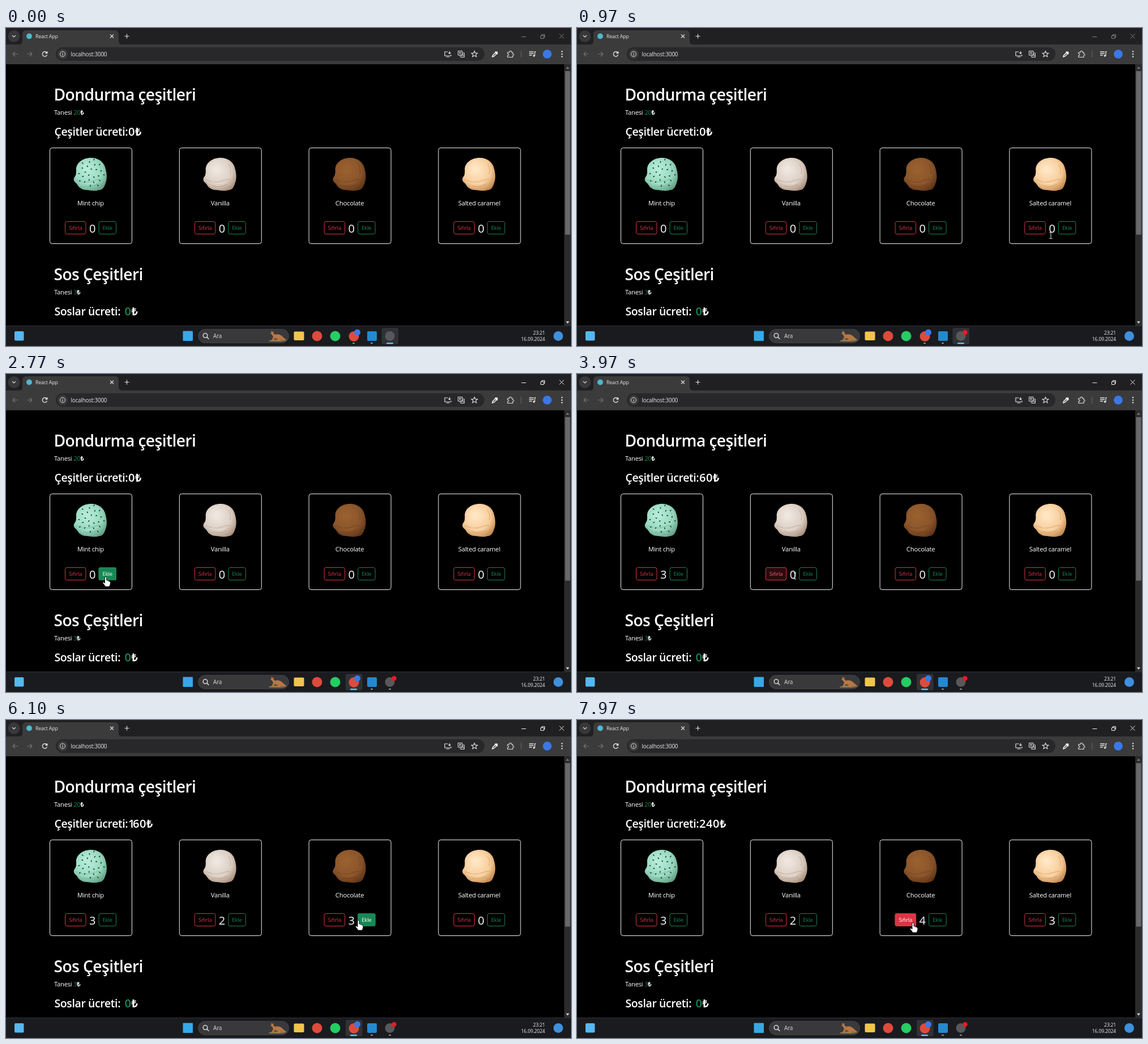
An HTML page with a canvas for the animation above (8000 ms loop, 998 px wide and 561 px high).

```html
<!DOCTYPE html>
<html lang="tr">
<head>
<meta charset="utf-8">
<title>React App</title>
<style>
html, body { margin: 0; width: 100%; height: 100%; overflow: hidden; background: #000; }
canvas { display: block; width: 100vw; height: 100vh; }
</style>
</head>
<body>
<canvas id="stage" width="998" height="561"></canvas>
<script>
const ctx = document.getElementById('stage').getContext('2d');
const LOOP = 8000, GREEN = '#198754', RED = '#dc3545', PITCH = 228.8;
const FOCUS_AT = 2700, REC_AT = 400, CURSOR_AT = 300;

const cards = [
  { name: 'Mint chip', tones: ['#b4ecd9', '#98d9c0', '#5f9a80'], chips: true, clicks: [2830, 3130, 3450] },
  { name: 'Vanilla', tones: ['#eee6df', '#dccfc4', '#a58a76'], clicks: [4250, 4550] },
  { name: 'Chocolate', tones: ['#99602f', '#8b552b', '#5c3316'], clicks: [5400, 5650, 5900, 6200] },
  { name: 'Salted caramel', tones: ['#ffe6c4', '#f7cd9b', '#bd8148'], clicks: [6850, 7050, 7250] }
];

// start time, end time, destination
const moves = [
  [1750, 2450, 176, 358], [3700, 4050, 416, 356], [4850, 5090, 622.5, 354],
  [6330, 6650, 878, 357], [7330, 7850, 593.5, 358]
];

function cursorAt(t) {
  let x = 837, y = 366;
  for (const [a, b, tx, ty] of moves) {
    const u = Math.min(1, Math.max(0, (t - a) / (b - a)));
    const s = u * u * (3 - 2 * u);
    x += (tx - x) * s;
    y += (ty - y) * s;
  }
  return { x, y };
}

function partAt(t) {
  if (t < CURSOR_AT) return null;
  const { x, y } = cursorAt(t);
  const card = Math.floor((x - 77) / PITCH), dx = x - card * PITCH;
  if (y > 341 && y < 365) {
    if (dx > 104 && dx < 142) return { card, kind: 'reset' };
    if (dx > 163.5 && dx < 195.5) return { card, kind: 'add' };
  }
  return dx > 145 && dx < 160 && y > 341 && y < 368 ? { card, kind: 'digit' } : null;
}

// Averaging the recent hover state gives a 150 ms fade.
function hoverLevel(t, card, kind) {
  let sum = 0;
  for (let k = 0; k < 10; k++) {
    const p = partAt(t - k * 15);
    if (p && p.card === card && p.kind === kind) sum++;
  }
  return sum / 10;
}

function text(s, x, y, size, color = '#fff', weight = 400, align = 'left') {
  ctx.font = `${weight} ${size}px "Open Sans", "Noto Sans", sans-serif`;
  ctx.letterSpacing = `${-0.02 * size}px`;
  ctx.textAlign = align;
  ctx.fillStyle = color;
  ctx.fillText(s, x, y);
  return x + ctx.measureText(s).width;
}

function rect(x, y, w, h, color) {
  ctx.fillStyle = color;
  ctx.fillRect(x, y, w, h);
}

function round(x, y, w, h, r, fill, stroke) {
  ctx.beginPath();
  ctx.roundRect(x, y, w, h, r);
  paint(fill, stroke);
}

function disc(x, y, r, fill, stroke, width) {
  ctx.beginPath();
  ctx.arc(x, y, r, 0, 7);
  paint(fill, stroke, width);
}

function paint(fill, stroke, width = 1) {
  if (fill) { ctx.fillStyle = fill; ctx.fill(); }
  if (stroke) { ctx.strokeStyle = stroke; ctx.lineWidth = width; ctx.stroke(); }
}

function path(d, x, y, fill, stroke, width) {
  const p = new Path2D(d);
  ctx.save();
  ctx.translate(x, y);
  if (fill) { ctx.fillStyle = fill; ctx.fill(p); }
  if (stroke) { ctx.strokeStyle = stroke; ctx.lineWidth = width || 1.2; ctx.stroke(p); }
  ctx.restore();
}

const line = (d, x, y, color = '#dedede', width = 1.2) => path(d, x, y, null, color, width);

function drawBrowser(active) {
  rect(0, 0, 998, 29, '#202022');
  rect(0, 29, 998, 35, '#3b3b3c');
  disc(14, 14.5, 10.5, '#38383a');
  line('M-3-1.5L0 1.5L3-1.5', 14, 14.5);
  ctx.beginPath();
  ctx.moveTo(23, 29);
  ctx.quadraticCurveTo(29, 29, 29, 23);
  ctx.lineTo(29, 11);
  ctx.quadraticCurveTo(29, 4, 36, 4);
  ctx.lineTo(192, 4);
  ctx.quadraticCurveTo(199, 4, 199, 11);
  ctx.lineTo(199, 23);
  ctx.quadraticCurveTo(199, 29, 205, 29);
  paint('#3b3b3c');
  disc(41, 14.5, 5, '#4fb6cf');
  text('React App', 52, 18, 8.8, '#e6e6e6');
  line('M-3-3L3 3M3-3L-3 3', 187, 14.5);
  line('M-4 0H4M0-4V4', 213.5, 14.5);

  const control = active ? '#f2f2f2' : '#858585';
  line('M-4 0H4', 914.5, 15.5, control, 1);
  line('M-3.5-1.5H2V3.5H-3.5ZM-1.5-1.5V-3.5H3.5V1.5H2', 948, 15, control, 1);
  line('M-4-4L4 4M4-4L-4 4', 981.5, 14.5, control, 1);

  line('M5 0H-4M0-4L-4 0L0 4', 16, 46, '#747474');
  line('M-5 0H4M0-4L4 0L0 4', 42, 46, '#747474');
  line('M3.5-2.5A4.2 4.2 0 1 0 4 1.5M4.3-4.5V-1.5H1', 68.5, 46, '#e4e4e4', 1.4);
  round(88, 34, 757, 24, 12, '#28282a');
  disc(100, 46, 9, '#3b3b3c');
  disc(100, 46, 4.5, null, '#e0e0e0', 1);
  line('M0-2.6V-1.4M0-.4V2.6', 100, 46);
  text('localhost:3000', 114.5, 50, 9.9, '#e8e8e8');

  line('M0-4H-5.5V3H5.5V1M-3 5H3M3-5V-.5M1-2.5L3-.5L5-2.5', 780.5, 46);
  line('M-5.5-5.5H2V2H-5.5ZM2-2H5.5V5.5H-1L-2 2M-4-3H.5M-2-4V-3Q-2-1-4 0M-3-2L0 .5M.5 4L2.5-.5L4.5 4', 804, 46, '#dedede', 1);
  line('M0-5.3L1.5-1.8L5.3-1.6L2.4 .9L3.4 4.7L0 2.6L-3.4 4.7L-2.4 .9L-5.3-1.6L-1.5-1.8Z', 827.5, 46);
  line('M-5 5L-4 2L1-3L3-1L-2 4Z', 864, 46, '#fff', 1.4);
  line('M0-4L4 0M2-2L4-4', 864, 46, '#fff', 2.6);
  line('M-5-3H-2Q-2-5.5 0-5.5T2-3H4V-.5Q6-.5 6 1T4 2.5V5.5H-5V2.5Q-3 2.5-3 1T-5-.5Z', 891, 46);
  rect(909.5, 40, 1, 12, '#68686a');
  line('M-6-4H2M-6-1H2M-6 2H-1M4 3V-4H6', 930, 46, '#dedede', 1.3);
  disc(932.5, 49, 1.8, '#dedede');
  disc(956, 46, 7.8, '#3b78e7');
  for (const y of [41.5, 46, 50.5]) disc(982, y, 1.3, '#e0e0e0');
}

function drawScrollbar() {
  rect(986, 64, 12, 462, '#2b2b2c');
  rect(987.5, 76, 9, 288.5, '#69696b');
  path('M-3 2L0-2L3 2Z', 992, 70, '#777');
  path('M-3-2L0 2L3-2Z', 992, 519.5, '#d6d6d6');
}

const SCOOP = 'M-25-7C-26-20-13-29 1-29C15-29 25-21 27-9C29-2 30 8 27 15C25 22 22 28 15 28' +
  'C9 30 2 29-4 28C-10 28-14 27-18 24C-22 22-22 18-26 15C-30 12-30 8-28 5C-25 2-25-2-25-7Z';

function drawScoop(x, y, { tones, chips }) {
  const g = ctx.createRadialGradient(-6, -9, 4, -3, -4, 38);
  tones.forEach((c, i) => g.addColorStop([0, 0.6, 1][i], c));
  path(SCOOP, x, y, g);
  ctx.globalAlpha = 0.45;
  line('M-24 9C-17 13-8 15 0 13S13 8 18 9M-12 20C-4 23 5 22 12 18M15-18C19-12 20-6 18 0', x, y, tones[2], 1.1);
  line('M-17-10C-15-18-8-23 0-24M-14 12C-6 17 3 17 9 15', x, y, tones[0], 1.4);
  ctx.globalAlpha = 1;
  if (!chips) return;
  for (let k = 1; k < 25; k++) {
    const a = k * 2.4, r = 5.1 * Math.sqrt(k);
    ctx.beginPath();
    ctx.ellipse(x + 1 + r * Math.cos(a), y - 2 + r * Math.sin(a), 1.6, 0.9, a, 0, 7);
    paint('#20362d');
  }
}

function drawButton(x, w, label, color, level) {
  round(x, 341.5, w, 22, 3, null, color);
  const mid = x + w / 2;
  text(label, mid, 356.3, 9.6, color, 400, 'center');
  if (!level) return;
  ctx.globalAlpha = level;
  round(x - 0.5, 341, w + 1, 23, 3, color);
  text(label, mid, 356.3, 9.6, '#fff', 400, 'center');
  ctx.globalAlpha = 1;
}

function priceLine(price, y) {
  let x = text('Tanesi ', 85, y, 11.2);
  x = text(price, x, y, 11.2, GREEN);
  text('₺', x, y, 11.2, '#fff', 600);
}

const title = (s, y) => text(s, 84.5, y, 28.2, '#fff', 600);

function drawPage(t) {
  rect(0, 64, 986, 462, '#000');
  title('Dondurma çeşitleri', 128);
  priceLine('20', 153);
  text('Çeşitler ücreti:', 85.5, 189.5, 19.5, '#fff', 600);

  const counts = cards.map(c => c.clicks.filter(k => t >= k).length);
  const total = 20 * counts.reduce((a, b) => a + b);
  let x = 216;
  for (const ch of total + '₺') {
    text(ch, x, 189.5, 20, '#fff', 600);
    x += ch === '1' ? 8 : 12;
  }

  cards.forEach((card, i) => {
    const dx = i * PITCH;
    round(77.5 + dx, 211.5, 145, 169, 4, '#000', '#f2f2f2');
    drawScoop(149 + dx, 258, card);
    text(card.name, 149.5 + dx, 312.7, 11.3, '#fff', 400, 'center');
    drawButton(104.5 + dx, 36.5, 'Sıfırla', RED, hoverLevel(t, i, 'reset'));
    text(counts[i], 152.5 + dx, 361, 20, '#fff', 400, 'center');
    drawButton(164 + dx, 30.5, 'Ekle', GREEN, hoverLevel(t, i, 'add'));
  });

  title('Sos Çeşitleri', 445);
  priceLine('3', 470);
  text('Soslar ücreti:', 85.5, 506.5, 19.5, '#fff', 600);
  text('0', 209.5, 506.5, 20, GREEN, 600);
  text('₺', 221.5, 506.5, 20, '#fff', 600);
}

function taskMark(x, active) {
  if (active) round(x - 6, 555, 12, 2.5, 1.2, '#5fc3ee');
  else round(x - 2, 555, 4, 2, 1, '#9a9a9a');
}

function drawTaskbar(active, recording) {
  rect(0, 525, 998, 36, '#1a1b1f');
  rect(0, 525, 998, 1, '#30303e');
  round(15, 535, 16.5, 16.5, 2, '#55b8f0');
  round(312.5, 534.5, 17.5, 17.5, 1, '#35a9e8');
  round(339.5, 531.5, 160, 24, 12, '#39393b', '#444446');
  disc(352, 542.5, 3.8, null, '#eee', 1.3);
  line('M0 0L3.5 3.5', 354.8, 545.3, '#eee', 1.3);
  text('Ara', 366, 547, 10, '#d8d8d8');
  // kangaroo resting on a patch of grass, facing left
  path('M0 18Q8 14 18 16L30 18Q26 20 0 19Z', 464, 534, '#8a7a50');
  path('M3 5L5 3L4 0L7 2L9 1L8 4L11 7Q18 5 23 9Q27 13 32 17Q27 18 22 16L20 18H14L16 15L11 13L8 17H5L8 11L6 7Z', 464, 534, '#b87845');

  round(active ? 600 : 663.5, 529, 29.5, 29, 3, '#303136');
  round(508.5, 535.5, 18, 15.5, 2, '#f3c44c');
  disc(549.5, 543.5, 9, '#dd4b3c');
  disc(581.5, 543.5, 9, '#27cc63');
  disc(614.5, 544, 9, '#dd4b3c');
  disc(620.5, 537, 5.5, '#3b78e7');
  round(638, 535, 17, 17, 2, '#2489d0');
  disc(678, 543.5, 8.5, '#58585c');
  if (recording) disc(685.5, 537, 4.2, '#f01820');
  taskMark(614, active);
  taskMark(646, false);
  taskMark(678, !active);

  text('23:21', 952, 540.5, 8.6, '#ededed', 400, 'right');
  text('16.09.2024', 952, 552, 8.6, '#ededed', 400, 'right');
  disc(975.5, 543.5, 8.5, '#3f90dd');
}

const HAND = 'M-1.5 1Q-1.5-.5 0-.5T1.5 1V6Q3.8 5 4.2 7Q6 6 6.4 8Q8.2 7.3 8.3 9.5V12Q8 14 6.5 17H-.5' +
  'Q-2 14-5 11Q-5.5 9-3.5 9.3L-1.5 11Z';

function drawCursor(t) {
  if (t < CURSOR_AT) return;
  const { x, y } = cursorAt(t), part = partAt(t);
  if (!part) path('M0 0V14L3.3 11L5.5 16L7.8 15L5.6 10.2H10Z', x, y, '#fff', '#000', 0.7);
  else if (part.kind === 'digit') line('M-2.5-5.5H-.7L0-5L.7-5.5H2.5M0-5V5M-2.5 5.5H-.7L0 5L.7 5.5H2.5', x, y, '#eee', 1);
  else path(HAND, x, y, '#fff', '#000', 0.8);
}

function frame(now) {
  const t = now % LOOP, active = t >= FOCUS_AT;
  drawPage(t);
  drawScrollbar();
  drawBrowser(active);
  drawTaskbar(active, t >= REC_AT);
  drawCursor(t);
  requestAnimationFrame(frame);
}
requestAnimationFrame(frame);
</script>
</body>
</html>
```
